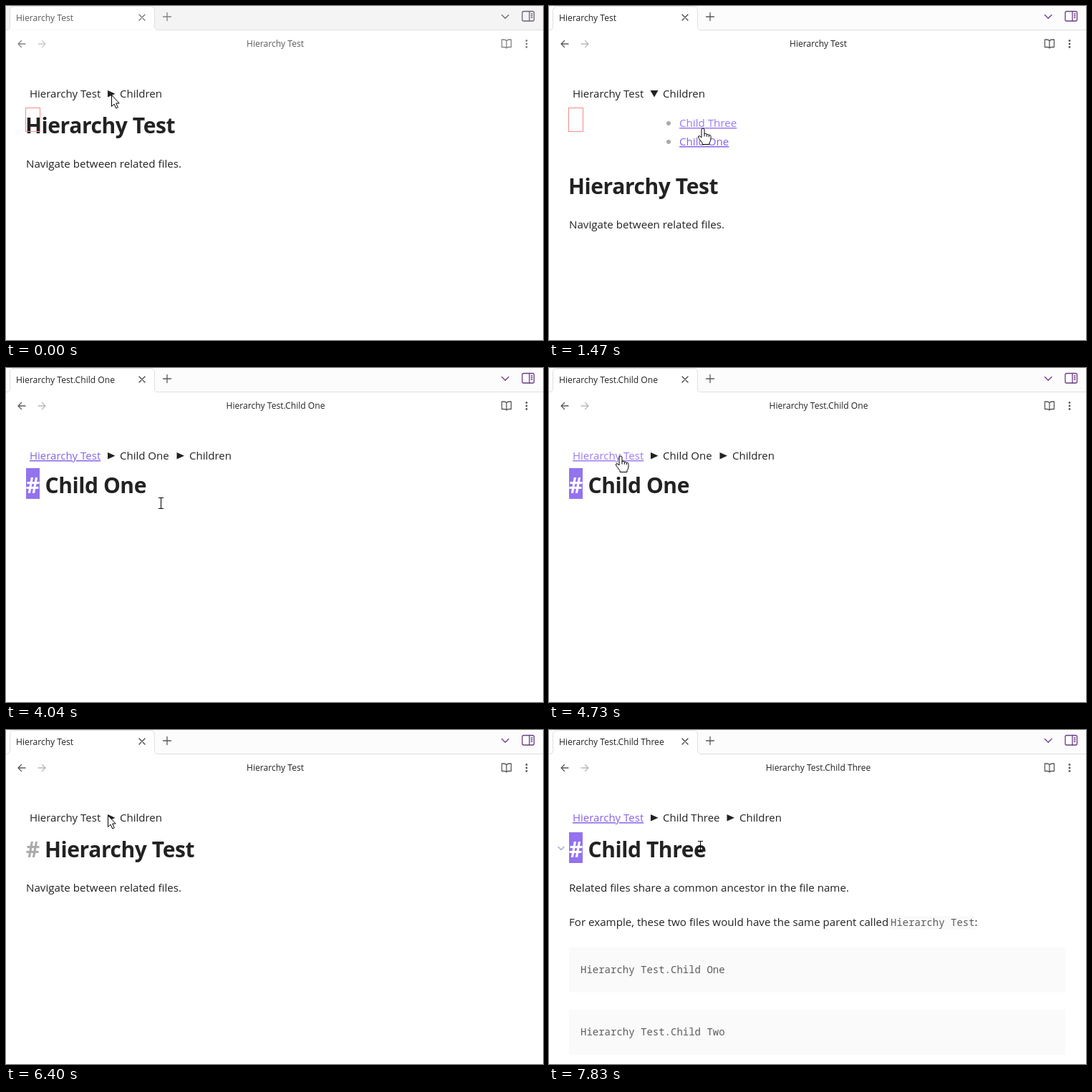
Write an HTML page that moves like this. It is 750 by 467 pixels and loops after 8 s.

```html
<!DOCTYPE html>
<html lang="en">
<head>
<meta charset="utf-8">
<title>Hierarchy navigation</title>
<style>
  html, body { margin: 0; width: 100%; height: 100%; overflow: hidden; background: #fff; }
  svg { display: block; width: 100%; height: 100%; }

  text { font: 15.15px "Open Sans", "Noto Sans", sans-serif; fill: #222; white-space: pre; }
  .crumb { font-size: 15px; }
  .tab, .name { font-size: 12.1px; fill: currentColor; }
  .name, .hash { text-anchor: middle; }
  .h1 { font-size: 30px; font-weight: 700; letter-spacing: -.42px; }
  .hash { font-size: 30px; font-weight: 700; fill: #ababab; }
  .block .hash { fill: #fff; }
  .block rect { fill: #9373ee; }
  .code { font: 14px "Noto Sans Mono", "DejaVu Sans Mono", monospace; fill: #5c5c5c; }
  .link { fill: #8763e6; text-decoration: underline; text-decoration-thickness: 1px; text-underline-offset: 2px; }
  .panel { fill: #fafafa; }
  .bullet { fill: #aaa; }
  .icon { fill: none; stroke: currentColor; stroke-width: 1.3; stroke-linecap: round; stroke-linejoin: round; }
  .outline { fill: none; stroke: #f58a8a; }
  .pale { stroke: #ffc0c0; }
  .pointer > * { fill: #fff; stroke: #000; stroke-linejoin: round; }

  /* One timeline of 8 s: 1% = 80 ms */
  .on, .bar, .ink, .accent, .hover, .shift, .pointer { animation: 8s step-end infinite; }
  .bar { animation-name: bar; animation-timing-function: linear; }
  .ink { animation-name: ink; animation-timing-function: linear; }
  .accent { animation-name: accent; animation-timing-function: linear; }
  @keyframes bar { 0%, 1% { fill: #f4f4f4 } 2.9%, 100% { fill: #fcfcfc } }
  @keyframes ink { 0%, 1% { color: #5a5a5a } 2.9%, 100% { color: #222 } }
  @keyframes accent { 0%, 1% { color: #6d6272 } 2.9%, 100% { color: #683c84 } }

  .home { animation-name: home; }
  .one { animation-name: one; }
  .three { animation-name: three; }
  @keyframes home { 0%, 64.125% { opacity: 1 } 29%, 96.875%, 100% { opacity: 0 } }
  @keyframes one { 0%, 64.125%, 100% { opacity: 0 } 29% { opacity: 1 } }
  @keyframes three { 0% { opacity: 0 } 96.875%, 100% { opacity: 1 } }

  .first { animation-name: first; }
  .second { animation-name: second; }
  @keyframes first { 0% { opacity: 1 } 29%, 100% { opacity: 0 } }
  @keyframes second { 0% { opacity: 0 } 29%, 100% { opacity: 1 } }

  .open { animation-name: open; }
  .closed { animation-name: closed; }
  .shift { animation-name: shift; }
  @keyframes open { 0%, 29% { opacity: 0 } 2.875%, 83.75%, 100% { opacity: 1 } }
  @keyframes closed { 0%, 29% { opacity: 1 } 2.875%, 83.75%, 100% { opacity: 0 } }
  @keyframes shift {
    0%, 29% { transform: none }
    2.875%, 83.75%, 100% { transform: translateY(85px) }
  }

  .blink1 { animation-name: blink1; }
  .blink2 { animation-name: blink2; }
  .blink3 { animation-name: blink3; }
  .blink4 { animation-name: blink4; }
  .blur { animation-name: blur; }
  @keyframes blink1 { 0%, 14.625%, 28.125% { opacity: 1 } 7.75%, 21.25%, 29%, 100% { opacity: 0 } }
  @keyframes blink2 { 0%, 44.625%, 58.5% { opacity: 1 } 36.75%, 51.875%, 63.125%, 100% { opacity: 0 } }
  @keyframes blink3 { 0%, 80%, 100% { opacity: 0 } 73% { opacity: 1 } }
  @keyframes blink4 { 0%, 93.875% { opacity: 0 } 86.25%, 95.875%, 100% { opacity: 1 } }
  @keyframes blur { 0%, 64.125%, 100% { opacity: 0 } 63.125% { opacity: 1 } }

  .hover3 { animation-name: hover3; }
  .hover1 { animation-name: hover1; }
  .hoverUp { animation-name: hoverUp; }
  @keyframes hover3 { 0%, 20.4%, 100% { fill: #8763e6 } 16.9%, 91.5% { fill: #9c7bee } }
  @keyframes hover1 { 0%, 29%, 100% { fill: #8763e6 } 20.4% { fill: #9c7bee } }
  @keyframes hoverUp { 0%, 64.125%, 100% { fill: #8763e6 } 56% { fill: #9c7bee } }

  .pointer { animation-name: travel; animation-timing-function: ease-in-out; }
  @keyframes travel {
    0%, 11.75% { transform: translate(147px, 124px) }
    18.375% { transform: translate(215px, 171px) }
    21.25% { transform: translate(215px, 187px) }
    22.25%, 50.5% { transform: translate(216px, 188px) }
    59.125%, 73% { transform: translate(100px, 123px) }
    77.125%, 89.125% { transform: translate(142px, 119px) }
    92% { transform: translate(209px, 155px) }
    93.875%, 100% { transform: translate(211px, 162px) }
  }
  .arrow { animation-name: arrow; }
  .hand { animation-name: hand; }
  .beam { animation-name: beam; }
  @keyframes arrow { 0%, 64.125% { opacity: 1 } 16.9%, 91.5%, 100% { opacity: 0 } }
  @keyframes hand { 0%, 29%, 64.125%, 96.875%, 100% { opacity: 0 } 16.9%, 56%, 91.5% { opacity: 1 } }
  @keyframes beam { 0%, 56% { opacity: 0 } 29%, 96.875%, 100% { opacity: 1 } }
</style>
</head>
<body>
<svg viewBox="0 0 750 467">
  <defs>
    <path id="right" d="M0 118v9.500l10.500-4.750z" fill="#222"/>
    <path id="down" d="M0 118h11l-5.500 9.500z" fill="#222"/>
  </defs>

  <!-- Window frame -->
  <rect class="bar" width="750" height="34"/>
  <path d="M0 33.500H1Q5.500 33.500 5.500 28V7Q5.500.5 12 .5H201Q207.500.5 207.500 7V28Q207.500 33.500 212 33.500H750" fill="#fff" stroke="#e0e0e0"/>
  <g class="ink">
    <path class="icon" d="M186 12l8 8M194 12l-8 8" opacity=".85"/>
    <g opacity=".75">
      <path class="icon" d="M225 9.500v11M219.500 15h11"/>
      <path class="icon" d="M27 53H17M21.500 48.500L17 53l4.500 4.500"/>
      <path class="icon" d="M699 49q-1-2-3.500-2H692.500v10.500H696q2 0 3 1.500q1-1.500 3-1.500h3.500V47H702.500q-2.500 0-3.500 2V58.500"/>
      <g fill="currentColor">
        <circle cx="727" cy="48.500" r="1.400"/><circle cx="727" cy="53" r="1.400"/><circle cx="727" cy="57.500" r="1.400"/>
      </g>
    </g>
    <path class="icon" d="M45 53h10M50.500 48.500L55 53l-4.500 4.500" opacity=".32"/>
  </g>
  <g class="accent">
    <path class="icon" d="M692.500 12.500l4.750 4.750 4.750-4.750"/>
    <rect class="icon" x="721" y="7.500" width="16.500" height="13.500" rx="2"/>
    <path class="icon" d="M731 7.500v13.500M733.500 11h1.500M733.500 13.500h1.500M733.500 16h1.500"/>
  </g>

  <!-- Parent note -->
  <g class="home on">
    <g class="ink">
      <text class="tab" x="14" y="21">Hierarchy Test</text>
      <text class="name" x="376" y="57">Hierarchy Test</text>
    </g>
    <text class="crumb" x="33" y="128">Hierarchy Test</text>
    <g class="closed on"><use href="#right" x="142"/></g>
    <g class="open on">
      <use href="#down" x="141.500"/>
      <circle class="bullet" cx="167" cy="164" r="3"/>
      <text class="link hover hover3" x="182" y="169">Child Three</text>
      <circle class="bullet" cx="167" cy="190" r="3"/>
      <text class="link hover hover1" x="182" y="195">Child One</text>
    </g>
    <text class="crumb" x="159" y="128">Children</text>
    <g class="shift">
      <text class="h1 first on" x="27" y="178">Hierarchy Test</text>
      <g class="second on">
        <text class="hash" x="37.500" y="178">#</text>
        <text class="h1" x="54" y="178">Hierarchy Test</text>
      </g>
      <text x="28" y="226">Navigate between related files.</text>
    </g>
    <g class="block blink3 on">
      <rect x="28" y="143" width="19" height="43"/>
      <text class="hash" x="37.500" y="178">#</text>
    </g>
    <rect class="outline blink1 on" x="27.500" y="142.500" width="20" height="33"/>
    <rect class="outline pale blink4 on" x="27.500" y="142.500" width="20" height="44"/>
  </g>

  <!-- First child note -->
  <g class="one on">
    <g class="ink">
      <text class="tab" x="14" y="21">Hierarchy Test.Child One</text>
      <text class="name" x="376.500" y="57">Hierarchy Test.Child One</text>
    </g>
    <text class="crumb link hover hoverUp" x="33" y="128">Hierarchy Test</text>
    <use href="#right" x="142"/>
    <text class="crumb" x="159" y="128">Child One</text>
    <use href="#right" x="238.500"/>
    <text class="crumb" x="256" y="128">Children</text>
    <text class="hash" x="37.500" y="175">#</text>
    <text class="h1" x="54.500" y="175">Child One</text>
    <g class="block blink2 on">
      <rect x="28" y="140" width="19" height="43"/>
      <text class="hash" x="37.500" y="175">#</text>
    </g>
    <rect class="outline blur on" x="27.500" y="140.500" width="20" height="43"/>
  </g>

  <!-- Third child note -->
  <g class="three on">
    <g class="ink">
      <text class="tab" x="14" y="21">Hierarchy Test.Child Three</text>
      <text class="name" x="376" y="57">Hierarchy Test.Child Three</text>
    </g>
    <text class="crumb link" x="33" y="128">Hierarchy Test</text>
    <use href="#right" x="142"/>
    <text class="crumb" x="159" y="128">Child Three</text>
    <use href="#right" x="248.500"/>
    <text class="crumb" x="266" y="128">Children</text>
    <path class="icon" d="M13 163.500l4 4 4-4" style="color:#9aa8cc"/>
    <g class="block">
      <rect x="28" y="143" width="19" height="43"/>
      <text class="hash" x="37.500" y="178">#</text>
    </g>
    <text class="h1" x="54.500" y="178">Child Three</text>
    <text x="28" y="226">Related files share a common ancestor in the file name.</text>
    <text x="28" y="274">For example, these two files would have the same parent called</text>
    <rect class="panel" x="475" y="260" width="121" height="19" rx="3"/>
    <text class="code" x="477" y="274">Hierarchy Test</text>
    <text x="594.500" y="274">:</text>
    <rect class="panel" x="28" y="304" width="693" height="63" rx="2"/>
    <text class="code" x="44" y="340">Hierarchy Test.Child One</text>
    <rect class="panel" x="28" y="391" width="693" height="63" rx="2"/>
    <text class="code" x="44" y="427">Hierarchy Test.Child Two</text>
  </g>

  <!-- Mouse pointer; the origin is its hot spot -->
  <g class="pointer">
    <path class="arrow on" d="M.5.5V16.500L4 13l2.700 6 2.600-1.200L6.700 12h4.500z"/>
    <path class="hand on" d="M-2 2a2 2 0 0 1 4 0V8a1.800 1.800 0 0 1 3.300.8a1.800 1.800 0 0 1 3 1a1.600 1.600 0 0 1 2.700 1.400V15q0 3-2 5v2.500H-1V20.500L-5.500 14.500q-2-3-.5-3.800q1.500-.6 4 2.300zM2 8v3.500M5.300 8.800v3M8.300 9.800v2.500"/>
    <path class="beam on" d="M-3 -6.500H4M-3 8.500H4M.5-6.500v15" style="fill:none"/>
  </g>
</svg>
</body>
</html>
```
